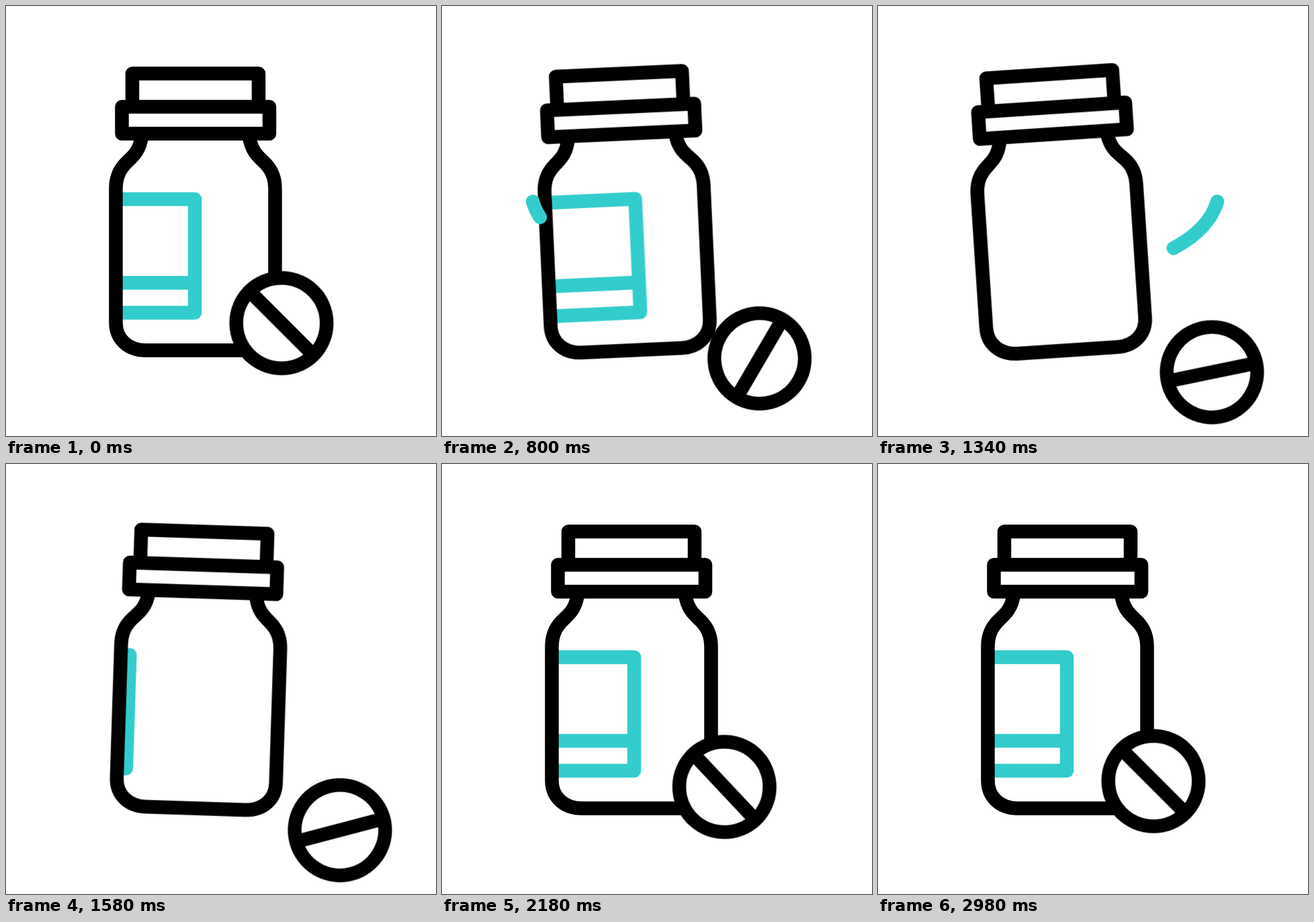
These frames come from a looping animation (640x640 px, 3600 ms). An HTML page:

```html
<!DOCTYPE html>
<html lang="en">
<head>
<meta charset="utf-8">
<title>Pill bottle</title>
<style>
@property --head { syntax: "<length>"; inherits: false; initial-value: 0px; }
@property --tail { syntax: "<length>"; inherits: false; initial-value: 0px; }

html, body { margin: 0; width: 100%; height: 100%; overflow: hidden; background: #fff; }
svg {
  display: block; width: 100%; height: 100%;
  fill: none; stroke: #000; stroke-width: 20.5;
  stroke-linecap: round; stroke-linejoin: round;
}
.teal { stroke: #33cccc; }

/* This curve is an exact smoothstep. */
.bottle, .label, .pill, .spin {
  animation: 3.6s cubic-bezier(.3333, 0, .6667, 1) infinite;
}
.bottle { transform-origin: 282px 512px; animation-name: rock; }
.label { animation-name: slide; }
.pill { animation-name: roll; }
.spin { animation-name: spin; }

.swoosh {
  stroke-dasharray: calc(var(--head) - var(--tail)) 3px;
  stroke-dashoffset: calc(0px - var(--tail));
  animation: 3.6s cubic-bezier(.3333, 0, .6667, 1) infinite;
}
.long { animation-name: longHead, longTail, longShow; }
.short { animation-name: shortHead, shortTail, shortShow; }

@keyframes rock {
  0% { transform: rotate(0deg); }
  16.11% { transform: rotate(-17.9deg); }
  27.36% { transform: rotate(9deg); }
  35.83% { transform: rotate(-4.2deg); }
  44.72% { transform: rotate(2deg); }
  54.17% { transform: rotate(-.8deg); }
  60.56%, 100% { transform: rotate(0deg); }
}
/* One full turn: the second label ends where the first began. */
@keyframes slide {
  0% { transform: translateX(0); }
  16.11% { transform: translateX(-66px); }
  51.25% { transform: translateX(956px); }
  68.89%, 100% { transform: translateX(945px); }
}
@keyframes roll {
  0% { transform: translate(410px, 472px); }
  34.17%, 44.44% { transform: translate(497px, 545px); }
  65%, 100% { transform: translate(410px, 472px); }
}
@keyframes spin {
  0% { transform: rotate(45deg); }
  38.89%, 41.67% { transform: rotate(169deg); }
  63.89% { transform: rotate(39deg); }
  82.78%, 100% { transform: rotate(45deg); }
}
@keyframes longHead { 0%, 19.67% { --head: 0px; } 37.14%, 100% { --head: 1px; } }
@keyframes longTail { 0%, 25.08% { --tail: 0px; } 42.56%, 100% { --tail: 1px; } }
@keyframes longShow {
  0% { opacity: 0; animation-timing-function: step-end; }
  19.7% { opacity: 1; animation-timing-function: step-end; }
  42.5%, 100% { opacity: 0; }
}
@keyframes shortHead { 0%, 24.44% { --head: 0px; } 36.11%, 100% { --head: 1px; } }
@keyframes shortTail { 0%, 25.61% { --tail: 0px; } 37.28%, 100% { --tail: 1px; } }
@keyframes shortShow {
  0% { opacity: 0; animation-timing-function: step-end; }
  24.5% { opacity: 1; animation-timing-function: step-end; }
  37.2%, 100% { opacity: 0; }
}
</style>
</head>
<body>
<svg viewBox="0 0 640 640">
  <defs>
    <path id="body" d="M202 194C198 222 183 227 174 239Q163.500 252 163.500 272V471C163.500 496 182 512.500 208 512.500H356C382 512.500 400.500 496 400.500 471V272Q400.500 252 390 239C381 227 366 222 362 194"/>
    <clipPath id="inside"><use href="#body"/></clipPath>
    <path id="tag" d="M23 287.500H281V456.500H23ZM23 412H281"/>
  </defs>

  <g class="bottle">
    <g clip-path="url(#inside)">
      <g class="label teal">
        <use href="#tag"/>
        <use href="#tag" x="-945"/>
      </g>
    </g>
    <use href="#body"/>
    <path fill="#fff" d="M188 100.500H376V150H188ZM172.500 150H392V190H172.500Z"/>
  </g>

  <path class="swoosh long teal" pathLength="1" d="M135 291A188 117 0 0 0 505 291"/>
  <path class="swoosh short teal" pathLength="1" d="M200 452Q320 490 440 452"/>

  <g class="pill">
    <g class="spin">
      <circle r="67.300" fill="#fff"/>
      <path d="M-62 0H62"/>
    </g>
  </g>
</svg>
</body>
</html>
```
